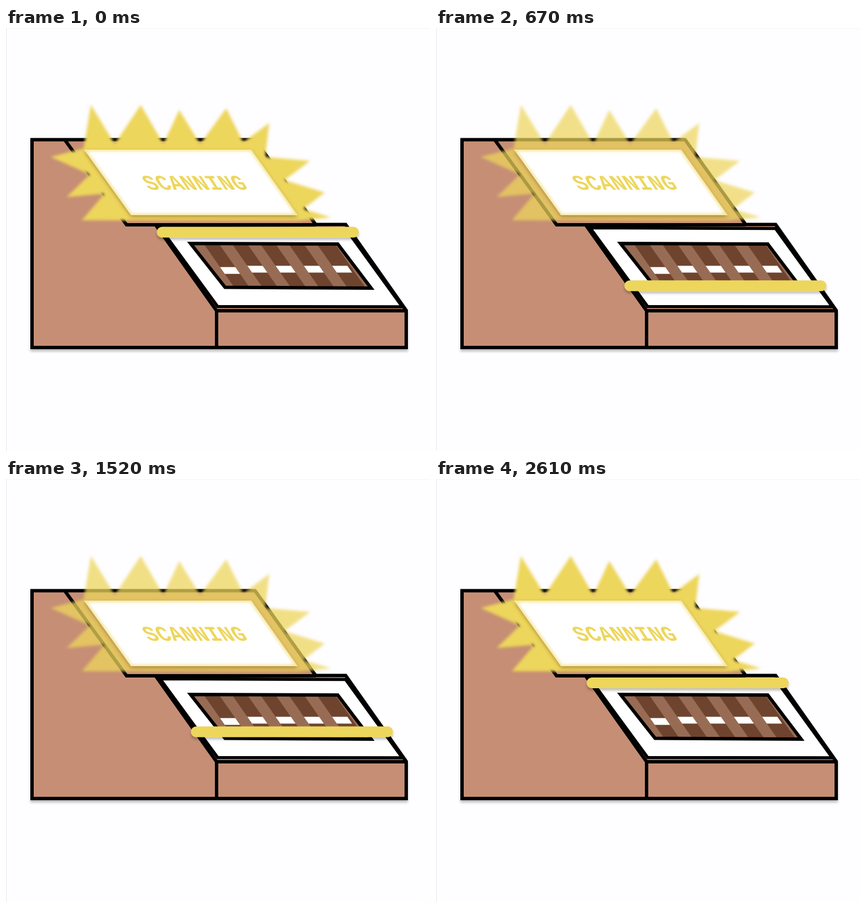
Animation, 749 px wide and 748 px high, one loop 2640 ms. Source, as an HTML page:

```html
<!DOCTYPE html>
<html lang="en">
<head>
<meta charset="utf-8">
<title>Scanner</title>
<style>
html, body { margin: 0; width: 100%; height: 100%; overflow: hidden; background: #fefdff; }
svg { display: block; width: 749px; height: 748px; }
text { font: bold 37px "Liberation Mono", monospace; }
.ink { stroke: #000; stroke-width: 6; stroke-miterlimit: 8; }
</style>
</head>
<body>
<svg viewBox="0 0 749 748" xmlns="http://www.w3.org/2000/svg">
  <defs>
    <filter id="drop" filterUnits="userSpaceOnUse" x="0" y="0" width="749" height="748">
      <feDropShadow dx="0" dy="4" stdDeviation="2" flood-opacity=".25"/>
    </filter>
    <filter id="halo" filterUnits="userSpaceOnUse" x="0" y="0" width="749" height="748">
      <feDropShadow dx="0" dy="3" stdDeviation="3" flood-color="#6e3c14" flood-opacity=".45"/>
    </filter>
    <filter id="soft" filterUnits="userSpaceOnUse" x="0" y="0" width="749" height="748">
      <feGaussianBlur stdDeviation="2.6"/>
    </filter>
    <clipPath id="screenClip"><path d="M138 215H433L515 331H221Z"/></clipPath>
    <clipPath id="windowClip"><path d="M326 381L586 382L645 460L387 458.5Z"/></clipPath>
  </defs>

  <rect width="749" height="748" fill="#fefdff"/>
  <path d="M.5 0V748" stroke="#e7e6ec"/>
  <path d="M0 .5H749" stroke="#f5f4f7"/>

  <g class="ink" fill="none">
    <path d="M46 197.5H440L547 347.5H600L707 499.5V565H46Z" fill="#c68e74" filter="url(#drop)"/>
    <path d="M104 198L213 348H547M265 349L372 500H707M372 500V565"/>
    <path d="M272 353.2L600 354.6L700 493L374 492.5Z" fill="#fff" stroke-width="5.4"/>
  </g>

  <g clip-path="url(#windowClip)">
    <rect x="320" y="375" width="335" height="90" fill="#986c54"/>
    <g id="stripes"></g>
  </g>
  <path class="ink" d="M326 381L586 382L645 460L387 458.5Z" fill="none" stroke-width="5.6"/>

  <path id="glow" fill="#edd65c" filter="url(#soft)" d="M134 340L174 293L107 299L148 259L79 228L137 213
    L150 136L192 205L238 136L278 205L306 145L343 205L389 142L419 202L465 168L458 228L537 235
    L492 269L563 291L525 320L574 335L515 341Z"/>

  <path d="M138 215H433L515 331H221Z" fill="#fff" filter="url(#halo)"/>
  <g clip-path="url(#screenClip)">
    <path d="M138 215H433L515 331H221Z" fill="none" stroke="#edd65c" stroke-width="6" opacity=".6" filter="url(#soft)"/>
  </g>
  <text fill="#edd65c" transform="matrix(1 0 .65 1 252 285.5)">SCANNING</text>

  <g id="bar">
    <rect x="266" y="351" width="357" height="19" rx="9.5" fill="#edd65c" filter="url(#drop)"/>
  </g>
</svg>
<script>
const LOOP = 2640, STEP = 30, TRAVEL = 125.8, SLOPE = 0.701;
const $ = id => document.getElementById(id);
const clamp = x => Math.min(1, Math.max(0, x));
const ease = x => (1 - Math.cos(Math.PI * clamp(x))) / 2;

// slanted stripe piece between two heights; x is given at y = 422
function slant(x, w, top, bottom, fill) {
  const at = y => x + (y - 422) * 0.7;
  return `<path fill="${fill}" d="M${at(top)} ${top}h${w}L${at(bottom) + w} ${bottom}h${-w}Z"/>`;
}

let parts = "";
for (let i = 0; i < 5; i++) {
  const x = 377.5 + 49.9 * i, y = i ? 420.5 : 422.8;
  parts += slant(x, i === 4 ? 32 : 27, 376, 464, "#6f442e");
  parts += slant(x, 27, y, y + 12, "#fff");
}
$("stripes").innerHTML = parts;

function draw(ms) {
  let t = Math.floor((ms % LOOP) / STEP) * STEP;
  if (t > LOOP - 40) t -= LOOP;
  const p = ease((t + 40) / 1042) - ease((t - 1118) / 1012);
  $("bar").setAttribute("transform", `translate(${p * TRAVEL * SLOPE} ${p * TRAVEL})`);
  $("glow").setAttribute("opacity", 1 - 0.37 * p);
}

const start = performance.now();
function tick() {
  draw(performance.now() - start);
  requestAnimationFrame(tick);
}
tick();
</script>
</body>
</html>
```
